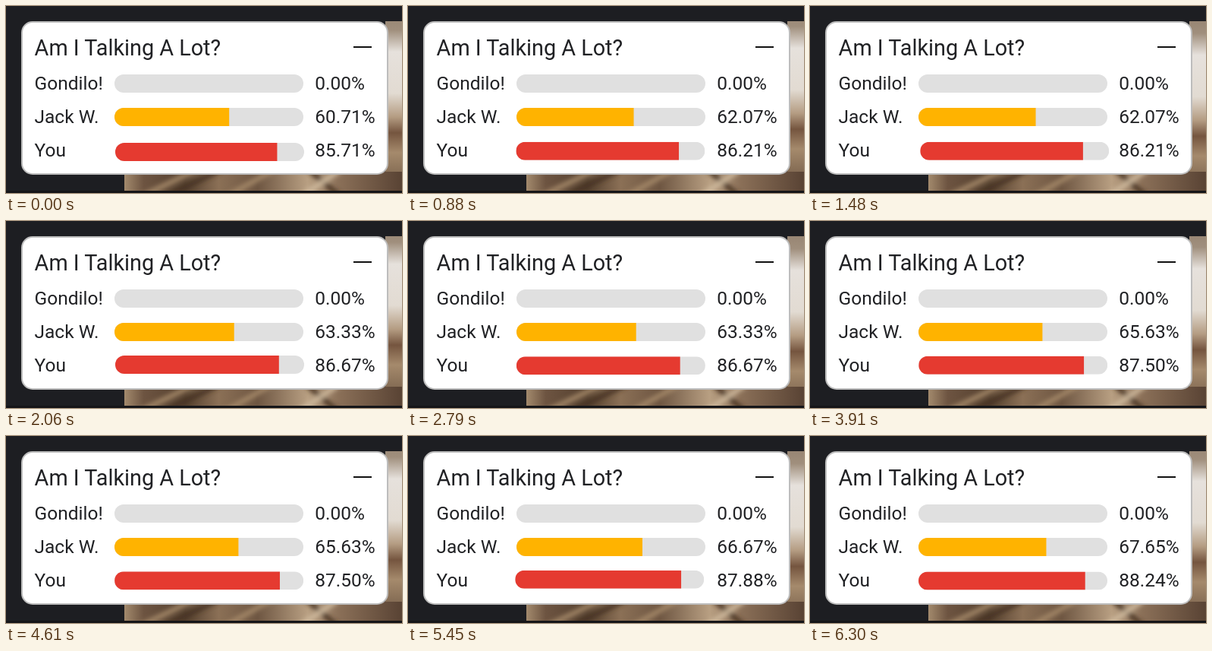
An HTML page that plays this animation: 522 px wide and 246 px high, repeating every 6.33 s.

```html
<!DOCTYPE html>
<html lang="en">
<head>
<meta charset="utf-8">
<style>
  html, body { margin: 0; width: 100%; height: 100%; overflow: hidden; background: #1d1e22; }
  svg { display: block; }
  text { font-family: Roboto, Arial, sans-serif; font-size: 24.5px; fill: #202124; }
  .title { font-size: 28.8px; }
</style>
</head>
<body>
<svg width="522" height="246" viewBox="0 0 522 246">
  <defs>
    <linearGradient id="wall" x2="0" y2="1">
      <stop offset="0" stop-color="#8d7966"/>
      <stop offset=".16" stop-color="#a08f7d"/>
      <stop offset=".27" stop-color="#e6e1dc"/>
      <stop offset=".48" stop-color="#e2dbd2"/>
      <stop offset=".6" stop-color="#b49c82"/>
      <stop offset=".68" stop-color="#75553f"/>
      <stop offset=".78" stop-color="#a58a6c"/>
      <stop offset="1" stop-color="#66503e"/>
    </linearGradient>
    <linearGradient id="floor" gradientUnits="userSpaceOnUse" x1="156" y1="222" x2="522" y2="222">
      <stop offset="0" stop-color="#a38a6d"/>
      <stop offset=".07" stop-color="#6d5441"/>
      <stop offset=".22" stop-color="#54402f"/>
      <stop offset=".34" stop-color="#8b7056"/>
      <stop offset=".48" stop-color="#6e5642"/>
      <stop offset=".66" stop-color="#b89f82"/>
      <stop offset=".77" stop-color="#8b7058"/>
      <stop offset="1" stop-color="#594334"/>
    </linearGradient>
    <filter id="soft" x="-20%" y="-60%" width="140%" height="220%"><feGaussianBlur stdDeviation="3"/></filter>
    <clipPath id="photo"><path d="M156 20H522V243H156Z"/></clipPath>
    <clipPath id="pill"><rect x="143" width="249" height="24" rx="12"/></clipPath>
  </defs>

  <g clip-path="url(#photo)">
    <rect id="strip" x="500" y="-10" width="22" height="260" fill="url(#wall)"/>
    <path d="M156 218H522V243H156Z" fill="url(#floor)"/>
    <g id="streaks" filter="url(#soft)" fill="none" stroke-width="6">
      <path d="M180 250L250 216M292 250L352 216" stroke="#a78b6b"/>
      <path d="M212 250L282 216M440 250L400 216" stroke="#463323"/>
      <path d="M390 250L440 216" stroke="#d0bb9f"/>
    </g>
  </g>
  <path d="M0 243H522V246H0Z" fill="#151518"/>

  <rect x="21" y="21" width="482" height="200" rx="14" fill="#fff" stroke="#bdbdbd" stroke-width="2"/>
  <text class="title" x="37.6" y="65">Am I Talking A Lot?</text>
  <path d="M458 53H482V55H458Z" fill="#111"/>
  <g id="rows"></g>
</svg>
<script>
  const LOOP = 6330;
  const $ = id => document.getElementById(id);

  const people = [['Gondilo!', '#e0e0e0'], ['Jack W.', '#ffb300'], ['You', '#e53a30']];
  $('rows').innerHTML = people.map(([name, color], i) => `
    <g transform="translate(0 ${90 + 44 * i})">
      <text x="37.5" y="20">${name}</text>
      <g class="bar"><g clip-path="url(#pill)">
        <rect x="143" width="249" height="24" fill="#e0e0e0"/>
        <rect class="fill" x="143" height="24" fill="${color}"/>
      </g></g>
      <text class="share" x="407.3" y="20"></text>
    </g>`).join('');
  const fills = document.querySelectorAll('.fill');
  const shares = document.querySelectorAll('.share');
  const shaken = document.querySelectorAll('.bar')[2];

  // Offsets at every tenth of a shake, about two shakes a second
  const shake = [[1, 1], [-1, -2], [-3, 0], [3, 2], [1, -1], [-1, 2], [-3, 1], [3, 1], [-1, -1], [1, 2], [1, -2]];
  const pace = [[0, .9], [880, 2.24], [2060, 4.4], [2790, 5.845], [3910, 8.04], [4610, 9.445], [6300, 12.85], [LOOP, 12.9]];

  const mix = (a, b, k) => a + (b - a) * k;

  function shakePhase(t) {
    const i = pace.findIndex(p => p[0] > t);
    const [t0, p0] = pace[i - 1], [t1, p1] = pace[i];
    return mix(p0, p1, (t - t0) / (t1 - t0));
  }

  function draw(now) {
    const t = now % LOOP;

    // One more second of the call is counted each second
    const total = 28 + Math.floor((t + 160) / 1000);
    [0, total - 11, total - 4].forEach((spoken, i) => {
      const part = spoken / total;
      fills[i].setAttribute('width', 249 * part);
      shares[i].textContent = (100 * part).toFixed(2) + '%';
    });

    const step = shakePhase(t) % 1 * 10;
    const i = Math.floor(step);
    const [x, y] = [0, 1].map(axis => mix(shake[i][axis], shake[i + 1][axis], step - i));
    shaken.setAttribute('transform', `translate(${x} ${y})`);

    const sway = Math.sin(t / LOOP * 10 * Math.PI);
    $('strip').setAttribute('transform', `translate(0 ${5 * sway})`);
    $('streaks').setAttribute('transform', `translate(${4 * sway} 0)`);
  }

  let start;
  function frame(now) {
    start ??= now;
    draw(now - start);
    requestAnimationFrame(frame);
  }
  draw(0);
  requestAnimationFrame(frame);
</script>
</body>
</html>
```
